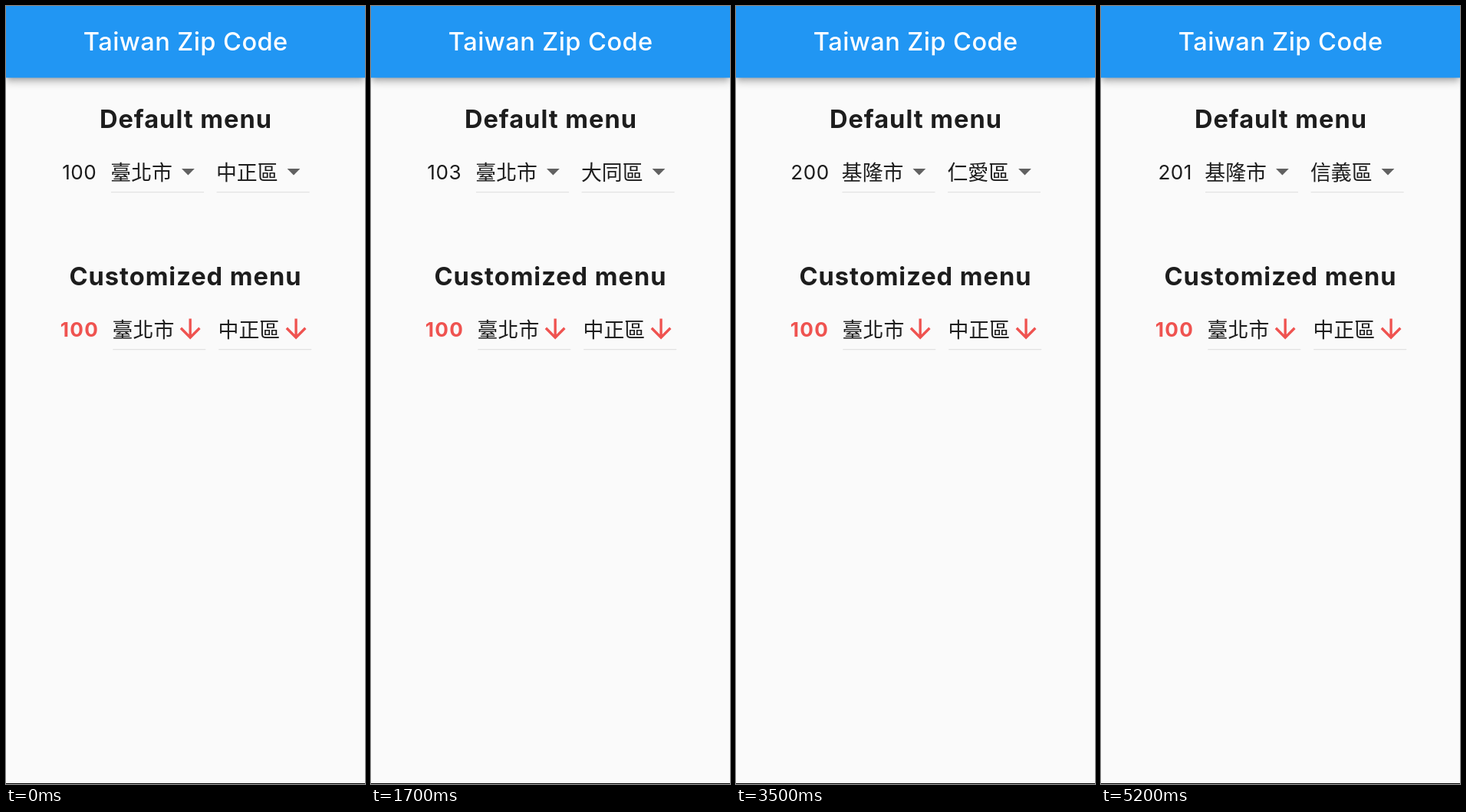
Write an HTML page that moves like this. It is 468x1014 px and loops after 6.2 s.

```html
<!DOCTYPE html>
<html lang="zh-Hant">
<head>
<meta charset="utf-8">
<title>Taiwan Zip Code</title>
<style>
  html, body { margin: 0; width: 100%; height: 100%; overflow: hidden; background: #fafafa; }
  #stage { position: relative; width: 468px; height: 1014px; overflow: hidden; background: #fafafa; }
  #stage > *, #menu > * { position: absolute; left: 0; top: 0; }
  svg { display: block; width: 468px; height: 1014px; }
  #bar {
    width: 468px; height: 93px;
    box-shadow: 0 3.4px 6.7px -1.7px rgba(0,0,0,.2), 0 6.7px 8.4px rgba(0,0,0,.14), 0 1.7px 16.8px rgba(0,0,0,.12);
  }
  #menu { width: 468px; height: 1014px; }
  #panel {
    width: 188px; border-radius: 3.4px; background: #fafafa;
    box-shadow: 0 8.4px 8.4px -5px rgba(0,0,0,.2), 0 13.4px 16.8px 1.7px rgba(0,0,0,.14), 0 5px 23.5px 3.4px rgba(0,0,0,.12);
  }
  #edge { top: 1013px !important; width: 468px; height: 1px; background: #000; }
  text { font-family: Inter, Roboto, sans-serif; fill: #1d1d1d; white-space: pre; }
  .mid { text-anchor: middle; }
  .title { font-size: 32.6px; font-weight: 500; letter-spacing: .45px; fill: #fff; }
  .head { font-size: 32.6px; font-weight: 700; letter-spacing: 1px; }
  .code { font-size: 26.1px; letter-spacing: .5px; }
  .strong { font-weight: 700; letter-spacing: 1.4px; fill: #ef5350; }
  .cjk { font-family: "Noto Sans CJK TC", "Noto Sans CJK JP", "Noto Sans CJK", sans-serif; font-size: 26.9px; }
</style>
</head>
<body>
<div id="stage">
  <div id="bar"></div>
  <svg id="page" viewBox="0 0 468 1014">
    <rect width="468" height="93.5" fill="#2196f3"/>
    <text class="mid title" x="234.3" y="58">Taiwan Zip Code</text>
    <text class="mid head" x="234.5" y="159">Default menu</text>
    <text class="mid head" x="234" y="364">Customized menu</text>
    <text class="mid code" id="zip" y="226"></text>
    <text class="mid code strong" x="96" y="431">100</text>
  </svg>
  <div id="menu">
    <div id="panel"></div>
    <svg id="items" viewBox="0 0 468 1014"></svg>
  </div>
  <div id="edge"></div>
</div>
<script>
const LOOP = 6200, STEP = 100, ROW = 80.7, PAD = 13.4;
const $ = id => document.getElementById(id);
const clamp = v => Math.max(0, Math.min(1, v));

function add(parent, tag, attrs, text) {
  const el = document.createElementNS('http://www.w3.org/2000/svg', tag);
  for (const k in attrs) el.setAttribute(k, attrs[k]);
  if (text) el.textContent = text;
  parent.append(el);
  return el;
}

// A dropdown button: label, icon and underline, drawn from its left edge.
function button(y, icon, label) {
  const g = add($('page'), 'g', {});
  const text = add(g, 'text', { class: 'cjk', x: -.7, y: y + 10.2 }, label);
  add(g, 'path', icon);
  add(g, 'rect', { x: 0, y: y + 25.5, width: 121, height: 1, fill: '#dcdcdc' });
  return {
    set(x, label) {
      g.setAttribute('transform', `translate(${x} 0)`);
      if (label) text.textContent = label;
    }
  };
}

const caret = { d: 'M92 212h16.8l-8.4 8.4z', fill: '#616161' };
const arrow = {
  d: 'M20 12l-1.41-1.41L13 16.17V4h-2v12.17l-5.58-5.59L4 12l8 8 8-8z',
  transform: 'translate(80.7 400.8) scale(1.681)', fill: '#ef5350'
};
const city = button(216.7, caret), area = button(216.7, caret);
button(421.7, arrow, '臺北市').set(139.3);
button(421.7, arrow, '中正區').set(277.2);

const rows = [
  { at: 0, zip: '100', zipX: 95.7, x: 137, city: '臺北市', area: '中正區' },
  { at: 800, zip: '103', zipX: 95.7, x: 137, city: '臺北市', area: '大同區' },
  { at: 3100, zip: '200', zipX: 96.5, x: 138.5, city: '基隆市', area: '仁愛區' },
  { at: 4900, zip: '201', zipX: 96.7, x: 136, city: '基隆市', area: '信義區' }
];

const menus = [
  { open: 450, close: 1700, steps: 1, x: 247.3, y: 162.2,
    names: '中正區 大同區 中山區 松山區 大安區 萬華區 信義區 士林區 北投區 內湖區 南港區 文山區' },
  { open: 1750, close: 3100, steps: 5, x: 109.8, y: 1, thumb: 2000,
    names: '臺北市 基隆市 連江縣 新北市 宜蘭縣 釣魚臺 新竹市 新竹縣 桃園市 苗栗縣 臺中市 彰化縣 南投縣' },
  { open: 3950, close: 4900, steps: 4, x: 249, y: 162.2,
    names: '仁愛區 信義區 中正區 中山區 安樂區 暖暖區 七堵區' }
];

for (const m of menus) {
  m.g = add($('items'), 'g', {});
  m.texts = m.names.split(' ').map((name, i) => add(m.g, 'text', {
    class: 'cjk', x: m.x + 26.3, y: m.y + PAD + ROW * (i + .5) + 10.2
  }, name));
  if (m.thumb) m.bar = add(m.g, 'rect', {
    x: m.x + 178, y: 6, width: 5, height: 798, rx: 2.5, fill: '#999'
  });
}

function drawMenu(m, t) {
  const n = m.texts.length, full = n * ROW + 2 * PAD;
  const p = clamp((t - m.open) / 300);
  const left = t < m.close ? 1 : clamp(1 - ((t - m.close) / STEP + 1) / m.steps);
  const grow = clamp((p - .25) * 4);
  const top = PAD * (1 - grow);
  const bottom = PAD + ROW + (full - PAD - ROW) * grow;
  $('menu').style.opacity = clamp(p * 4) * left;
  Object.assign($('panel').style, {
    left: m.x + 'px', top: m.y + top + 'px', height: bottom - top + 'px'
  });
  // The chosen first entry is always visible; the others fade in one by one.
  const unit = .5 / (n + 1.5);
  m.texts.forEach((el, i) => {
    const start = .5 + (i + 1) * unit;
    el.style.opacity = i ? clamp((p - start) / Math.min(1 - start, 1.5 * unit)) : 1;
  });
  if (m.bar) m.bar.style.opacity = clamp((t - m.thumb) / 200);
}

function draw(ms) {
  const t = Math.floor(ms % LOOP / STEP) * STEP;
  const r = rows.filter(row => row.at <= t).pop();
  $('zip').textContent = r.zip;
  $('zip').setAttribute('x', r.zipX);
  city.set(r.x, r.city);
  area.set(r.x + 137.6, r.area);

  const active = menus.find(m => t > m.open && t < m.close + m.steps * STEP);
  $('menu').style.display = active ? 'block' : 'none';
  for (const m of menus) m.g.style.display = m === active ? '' : 'none';
  if (active) drawMenu(active, t);
}

const begin = performance.now();
function tick() {
  draw(performance.now() - begin);
  requestAnimationFrame(tick);
}
tick();
</script>
</body>
</html>
```
